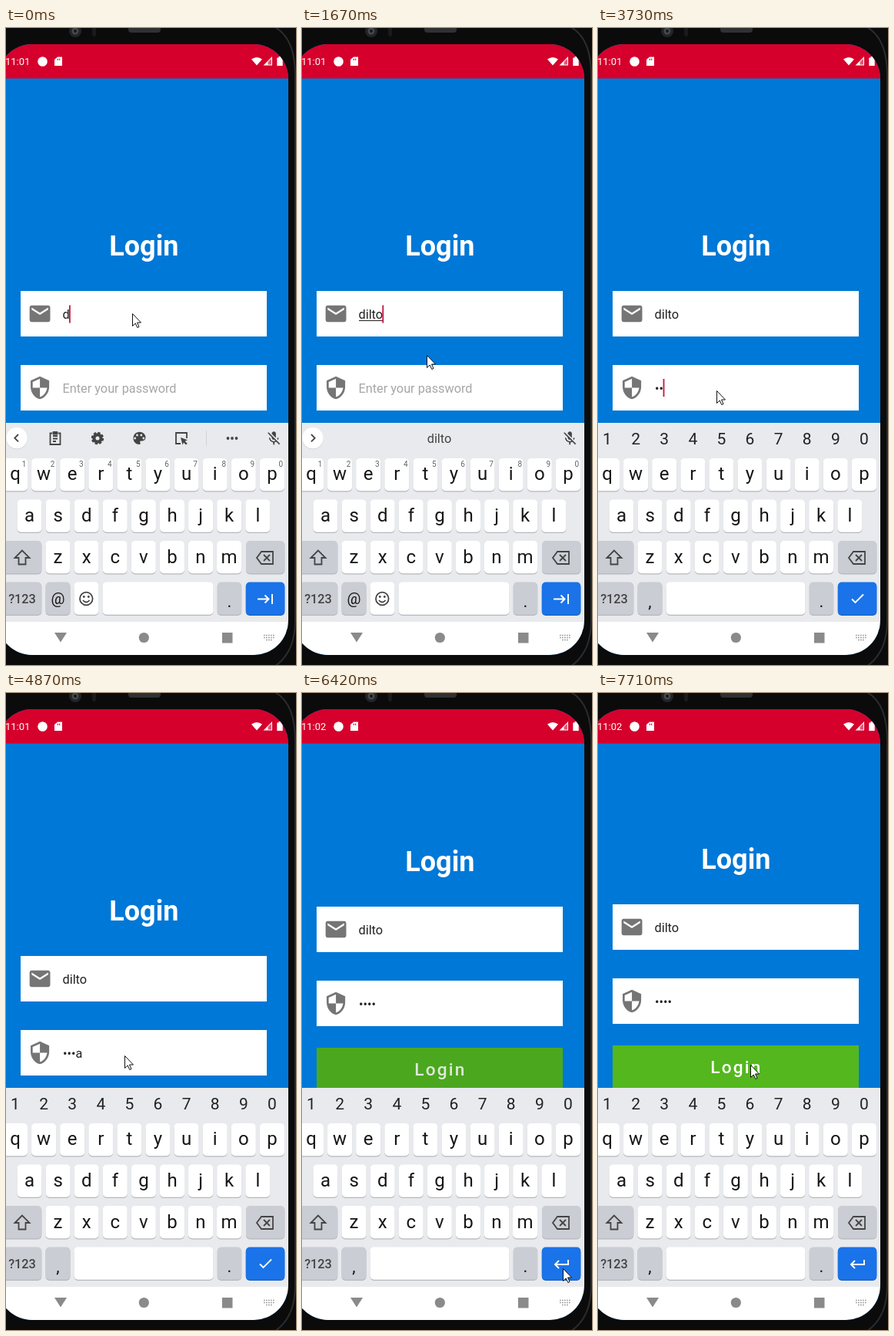
An HTML page that plays this animation: 377x826 px, repeating every 8000 ms.

```html
<!DOCTYPE html>
<html lang="en">
<head>
<meta charset="utf-8">
<title>Login form</title>
<style>
  html, body { margin: 0; width: 100%; height: 100%; overflow: hidden; background: #111; }
  svg { display: block; width: 377px; height: 826px; font-family: Roboto, sans-serif; }
  .mid { text-anchor: middle; }
  .line { fill: none; stroke: #444; stroke-width: 1.8; }
  .input { font-size: 16.3px; fill: #222; }
</style>
</head>
<body>
<svg viewBox="0 0 377 826">
  <defs>
    <clipPath id="screen"><rect x="-11" y="21" width="378" height="792" rx="45"/></clipPath>
  </defs>

  <!-- phone body -->
  <rect width="377" height="826" fill="#0b0b0c"/>
  <path d="M348 -2Q376 12 376 62V768Q376 810 349 828" fill="none" stroke="#2a2c2e" stroke-width="2"/>
  <circle cx="90" cy="4" r="8" fill="#222426"/>
  <circle cx="90" cy="4" r="4.5" fill="#454a50"/>
  <circle cx="90" cy="4" r="2" fill="#15181c"/>
  <rect x="112" y="-3" width="5" height="14" rx="2" fill="#191a1b"/>
  <rect x="159" y="-4" width="42" height="10" rx="4" fill="#303133"/>

  <g clip-path="url(#screen)">
    <rect y="21" x="-11" width="378" height="792" fill="#0078d7"/>

    <g id="page">
      <text class="mid" x="179.3" y="295" font-size="36" font-weight="700" fill="#fff">Login</text>
      <path d="M19 341h320v59h-320zM19 437h320v59h-320z" fill="#fff" stroke="#fff" stroke-width="0"/>
      <path transform="translate(28 354.5) scale(1.34)" fill="#757575" d="M20 4H4c-1.1 0-2 .9-2 2v12c0 1.1.9 2 2 2h16c1.1 0 2-.9 2-2V6c0-1.1-.9-2-2-2zm0 4l-8 5-8-5V6l8 5 8-5z"/>
      <path transform="translate(28 450.5) scale(1.34)" fill="#757575" d="M12 1L3 5v6c0 5.55 3.84 10.74 9 12 5.16-1.26 9-6.45 9-12V5zm0 11h7c-.53 4.12-3.28 7.79-7 8.94V12H5V6.3l7-3.11z"/>
      <text id="user" class="input" x="73.5" y="377"></text>
      <rect id="underline" x="74" y="379" height="1" fill="#222"/>
      <text id="hint" class="input" x="73.5" y="473">Enter your password</text>
      <text id="pass" class="input" x="74" y="473"></text>
      <rect id="caret" width="1.8" height="23" fill="#c9103f"/>
      <rect id="button" x="19" y="524" width="320" height="60"/>
      <text id="buttonText" x="146.3" y="560" font-size="22.6" font-weight="500" letter-spacing="2.2">Login</text>
    </g>

    <!-- status bar -->
    <rect x="-11" y="21" width="378" height="44.5" fill="#d5002c"/>
    <g fill="#fff">
      <text id="clock" x="-1" y="48" font-size="13"></text>
      <circle cx="47.5" cy="43.5" r="6.3"/>
      <path d="M67 37.5h6v11.5H63v-8z"/>
      <path d="M319 40.5q7-5 14 0l-7 8zM334.5 48.5l11.5-11.5v11.5zM354.5 37h3v1.5h2.2v10.5h-7.4v-10.5h2.2z"/>
    </g>
    <path d="M340.5 44v3.5h4.5v-8z" fill="#d5002c" opacity=".65"/>
    <path d="M67.3 39.5v2.5M69.7 39.5v2.5" stroke="#d5002c"/>

    <!-- keyboard -->
    <rect x="-11" y="512" width="378" height="258" fill="#e8eaed"/>
    <g id="keys"></g>
    <g id="textMode">
      <g id="tools">
        <path class="line" d="M60 525.5h-2.5v14.5h13v-14.5H68M61 529h6M61 532.5h6M61 536h4"/>
        <rect x="60.5" y="523" width="7" height="4.5" rx="1" fill="#444"/>
        <circle class="line" cx="119" cy="532" r="4.6" style="stroke-width:4.2"/>
        <circle class="line" cx="119" cy="532" r="7" style="stroke-width:2.4" stroke-dasharray="3.4 2.1"/>
        <path transform="translate(162.8 521.2) scale(.89)" fill="#444" d="M12 3c-5 0-9 4-9 9s4 9 9 9c.8 0 1.5-.7 1.5-1.5 0-.4-.2-.7-.4-1-.2-.3-.4-.6-.4-1 0-.8.7-1.5 1.5-1.5H16c2.8 0 5-2.2 5-5 0-4.4-4-8-9-8z"/>
        <g fill="#e8eaed"><circle cx="167.7" cy="532" r="1.4"/><circle cx="170.5" cy="528" r="1.4"/><circle cx="175.8" cy="528" r="1.4"/><circle cx="178.8" cy="532" r="1.4"/></g>
        <path class="line" d="M227 539h-6v-14h14v7"/>
        <path d="M227 531l9 3.3-3.3 1.5 3 3-1.7 1.7-3-3-1.5 3z" fill="#444"/>
        <path d="M260.5 522v20" stroke="#cfd1d4"/>
        <g fill="#444"><circle cx="288.5" cy="532" r="1.9"/><circle cx="294" cy="532" r="1.9"/><circle cx="299.5" cy="532" r="1.9"/></g>
      </g>
      <circle cx="14" cy="532.5" r="13.7" fill="#c9cbce"/>
      <circle cx="14" cy="531.7" r="13.7" fill="#fff"/>
      <path id="chevron" class="line"/>
      <text id="suggestion" class="mid" x="178.5" y="538" font-size="16.3" fill="#444"></text>
      <path transform="translate(337.5 521.5) scale(.89)" fill="#444" d="M19 11h-1.7c0 .7-.2 1.4-.4 2l1.2 1.3c.6-1 .9-2.1.9-3.3zm-4 .2V5c0-1.7-1.3-3-3-3S9 3.3 9 5v.2zM4.3 3L3 4.3l6 6v.7c0 1.7 1.3 3 3 3l.7-.1 1.6 1.7c-.7.3-1.5.5-2.3.5-2.8 0-5.3-2.1-5.3-5.1H5c0 3.4 2.7 6.2 6 6.7V21h2v-3.3c.9-.1 1.8-.4 2.5-.9l4.2 4.2 1.3-1.3z"/>
    </g>
    <g class="line">
      <path d="M21 677.5l-9.5 9.5h5v8.500h9v-8.500h5z"/>
      <path d="M332 679h15v16h-15l-6-8zM335 683l8 8M343 683l-8 8"/>
    </g>
    <path id="action" fill="none" stroke="#fff" stroke-width="1.9"/>

    <!-- navigation bar -->
    <rect x="-11" y="770" width="378" height="43" fill="#fff"/>
    <g fill="#8a8a8a">
      <path d="M63 784h16l-8 12.500zM281 784h13.500v13.500h-13.500z"/>
      <circle cx="179.300" cy="790.500" r="6.600"/>
    </g>
    <path d="M335 787.500h14M335 790.500h14M338 793.500h8" stroke="#999" stroke-width="1.500" stroke-dasharray="1.700 1.300"/>
  </g>

  <path id="pointer" d="M.5 .5V16.500L4.200 13L6.800 18.500L9 17.500L6.500 12H11.500Z" fill="#fff" stroke="#111"/>
</svg>

<script>
const LOOP = 8000, NAME = "dilto", PITCH = 37.1;
const $ = id => document.getElementById(id);
const set = (id, attrs) => { for (const k in attrs) $(id).setAttribute(k, attrs[k]); };
const show = (id, on) => { $(id).style.display = on ? "" : "none"; };

// Latest value whose start time has passed; rows are [start, ...values].
const at = (track, t) => track.findLast(row => row[0] <= t).slice(1);

const nameLength = [[0, 1], [120, 2], [380, 3], [500, 4], [1020, 5]];
const underlined = [[0, 0], [250, 2], [500, 3], [770, 4], [1300, 5], [2310, 0]];
const password = [[0, ""], [2830, "•"], [3200, "••s"], [3730, "••"], [4240, "•••"], [4360, "•••a"], [5800, "••••"]];
const caretField = [[0, "user"], [1790, ""], [2430, "pass"], [4870, ""], [5410, "pass"], [5680, ""]];
const scroll = [[0, 0], [6420, -64], [6570, -67]];
const pointer = [
  [0, 164, 370], [1550, 164, 391], [1670, 162, 424], [1790, 157, 455], [1910, 154, 470],
  [5120, 182, 514], [5270, 242, 630], [5410, 272, 660], [5530, 294, 679], [5680, 316, 709],
  [5800, 332, 734], [5920, 339, 746], [6820, 308, 677], [6970, 264, 596], [7090, 228, 529],
  [7240, 208, 489], [7400, 198, 482]
];
const icons = {
  tab: "M327 740.5h14M336.500 735.500l5 5-5 5M346 734v13",
  check: "M330 740.500l4.500 4.500L345 734.500",
  enter: "M346 735v6h-17M334 736l-5 5 5 5"
};

const key = (x, y, w, fill, id = "", shadow = "#b5b8bc") =>
  `<rect x="${x}" y="${y + 1.2}" width="${w}" height="42.3" rx="5" fill="${shadow}"/>` +
  `<rect id="${id}" x="${x}" y="${y}" width="${w}" height="42.3" rx="5" fill="${fill}"/>`;
const label = (text, x, y, size, fill = "#161616", more = "") =>
  `<text class="mid" x="${x}" y="${y}" font-size="${size}" fill="${fill}" ${more}>${text}</text>`;

function buildKeys() {
  let keys = "", digits = "", small = "";
  [["qwertyuiop", 12, 558], ["asdfghjkl", 30.5, 611.5], ["zxcvbnm", 67.5, 665]].forEach(([row, x0, y], r) =>
    [...row].forEach((c, i) => {
      const x = x0 + i * PITCH;
      keys += key(x - 16, y, 32, "#fff") + label(c, x, 586 + r * 54, 24);
    }));
  for (let i = 0; i < 10; i++) {
    const x = 12 + i * PITCH, n = (i + 1) % 10;
    digits += label(n, x, 540, 21, "#222");
    small += label(n, x + 11.5, 568.5, 10, "#5f6368");
  }
  const grey = "#cacdd3";
  keys += key(-8, 665, 54.3, grey) + key(312, 665, 50.3, grey) + key(-8, 718.5, 54.3, grey) +
    key(51.5, 718.5, 32, grey) + key(274.7, 718.5, 31.5, grey) +
    key(311.8, 718.5, 50.5, "#1a73e8", "actionKey", "#1a62c4") +
    label("?123", 21, 746, 16.3, "#444", 'font-weight="500"') + label(".", 290.5, 751, 22);
  const face = `<circle class="line" cx="104.3" cy="740" r="8.3"/><path class="line" d="M100 742q4.300 5 8.600 0"/>` +
    `<circle cx="101.300" cy="737.500" r="1.400" fill="#444"/><circle cx="107.300" cy="737.500" r="1.400" fill="#444"/>`;
  $("keys").innerHTML = keys +
    `<g id="mailKeys">${small}${key(88.5, 718.5, 32, "#fff")}${key(125.6, 718.5, 144, "#fff")}${face}${label("@", 67.5, 747, 20)}</g>` +
    `<g id="passKeys">${digits}${key(88.5, 718.5, 181, "#fff")}${label(",", 67.5, 751, 22)}</g>`;
}

function draw(t) {
  const passMode = t >= 2310, typing = t >= 250, scrolled = t >= 6420, hot = t >= 7710;
  const [marked] = at(underlined, t), [field] = at(caretField, t), [x, y] = at(pointer, t);

  $("user").textContent = NAME.slice(0, at(nameLength, t)[0]);
  $("pass").textContent = at(password, t)[0];
  $("clock").textContent = scrolled ? "11:02" : "11:01";
  $("suggestion").textContent = NAME.slice(0, marked);
  set("underline", { width: marked ? $("user").getSubStringLength(0, marked) : 0 });
  show("hint", t < 2830);
  $("hint").style.fill = t < 2160 ? "#a6a6a6" : "#999";

  show("caret", field);
  if (field) set("caret", {
    x: 73.6 + $(field).getComputedTextLength() - (field === "user" ? .8 : 0),
    y: field === "user" ? 359.5 : 455
  });

  show("textMode", !passMode);
  show("mailKeys", !passMode);
  show("passKeys", passMode);
  show("tools", !typing);
  set("chevron", { d: typing ? "M12 527l4.700 4.700-4.700 4.700" : "M16 527l-4.700 4.700 4.700 4.700" });
  set("action", { d: scrolled ? icons.enter : passMode ? icons.check : icons.tab });
  set("actionKey", { fill: t >= 6170 && !scrolled ? "#1557b8" : "#1a73e8" });

  set("page", { transform: `translate(0 ${at(scroll, t)[0]})` });
  set("button", { fill: hot ? "#54b71e" : "#4ba81e" });
  set("buttonText", { fill: hot ? "#fff" : "#e0e8dc" });
  set("pointer", { transform: `translate(${x} ${y})` });
}

buildKeys();
const start = performance.now();
(function tick() {
  draw((performance.now() - start) % LOOP);
  requestAnimationFrame(tick);
})();
</script>
</body>
</html>
```
